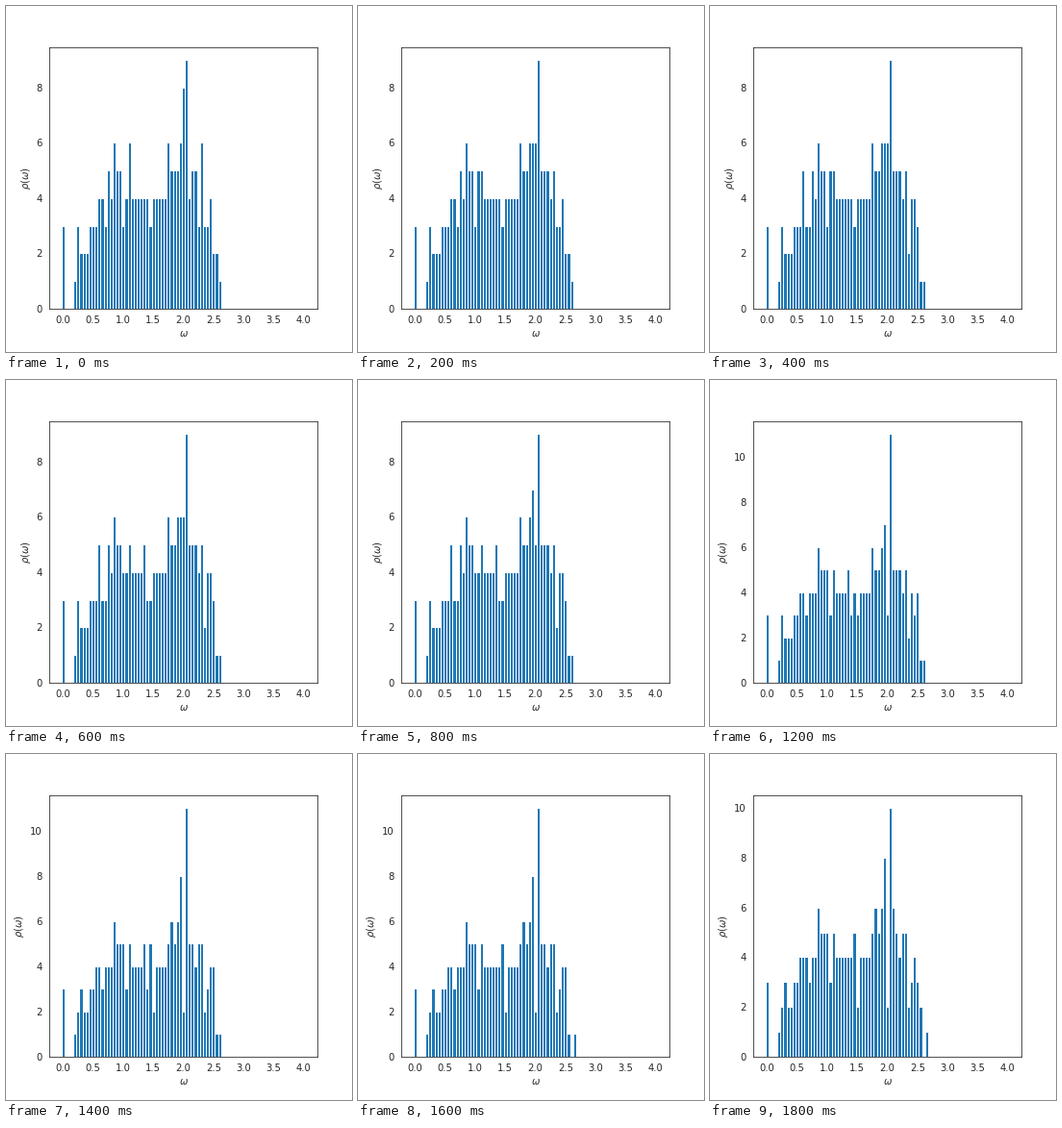
Write a matplotlib script that moves like this. It is 360 px wide and 360 px high and loops after 2000 ms.

```python
import numpy as np
import matplotlib.pyplot as plt
from matplotlib.animation import FuncAnimation
from matplotlib.ticker import MultipleLocator

INK = "0.15"
STEP = 0.05
BINS = 81
FRAMES = 10
DRIFT = 0.1        # bins per frame
DIP = 0.5          # depth of a dip, in bins
ZERO_MODES = 3

# Density of the steady modes: bin -> level, linear in between.
DENSITY = {4: 1, 12: 3, 14: 2, 15: 4, 16: 4, 17: 5.5, 19: 4.5, 21: 1.5,
           22: 5, 23: 4, 27: 3.1, 30: 1.9, 31: 3.2, 39: 5, 40: 2, 41: 7,
           42: 4, 43: 5, 45: 3, 46: 5, 47: 1.3, 49: 2.3, 52: 0}

# Moving modes by their starting frequency, in bins.
FALLING = np.array([12.45, 13.15, 14.85, 15.55, 21.25, 21.55, 22.05, 30.45,
                    30.65, 39.05, 40.05, 40.35, 40.65, 46.05])
RISING = np.array([5.35, 35.35, 40.45, 40.55, 40.95, 41.15, 41.95, 44.35,
                   47.85, 48.35, 49.55, 52.25])
DIPPING = np.array([28.35, 51.2])

plt.rcParams.update({
    "font.family": "DejaVu Sans",
    "font.size": 10,
    "mathtext.fontset": "dejavusans",
    "text.color": INK,
    "axes.labelcolor": INK,
    "axes.edgecolor": INK,
    "axes.linewidth": 0.8,
    "xtick.color": INK,
    "ytick.color": INK,
    "xtick.bottom": False,
    "ytick.left": False,
})

bins = np.arange(BINS)
steady = np.ceil(np.interp(bins, list(DENSITY), list(DENSITY.values()),
                           left=0, right=0)).astype(int)
steady[0] = ZERO_MODES


def histogram(frame):
    moving = np.concatenate([
        FALLING - DRIFT * frame,
        RISING + DRIFT * frame,
        DIPPING - DIP * np.sin(np.pi * frame / FRAMES),
    ])
    return steady + np.bincount(moving.astype(int), minlength=BINS)


fig = plt.figure(figsize=(5, 5), dpi=72, facecolor="white")
fig.subplots_adjust(left=0.125, right=0.9, bottom=0.125, top=0.88)
ax = fig.add_subplot()
bars = ax.bar(bins * STEP, histogram(0), width=STEP,
              color="#1f77b4", edgecolor="white", linewidth=1)

span = BINS * STEP
ax.set_xlim(-STEP / 2 - 0.05 * span, -STEP / 2 + 1.05 * span)
ax.xaxis.set_major_locator(MultipleLocator(0.5))
ax.yaxis.set_major_locator(MultipleLocator(2))
ax.set_xlabel(r"$\omega$")
ax.set_ylabel(r"$\rho(\omega)$")


def update(frame):
    counts = histogram(frame)
    for bar, count in zip(bars, counts):
        bar.set_height(count)
    ax.set_ylim(0, 1.05 * counts.max())
    return bars


anim = FuncAnimation(fig, update, frames=FRAMES, interval=200,
                     repeat=True, repeat_delay=0, blit=False)
plt.show()
```
